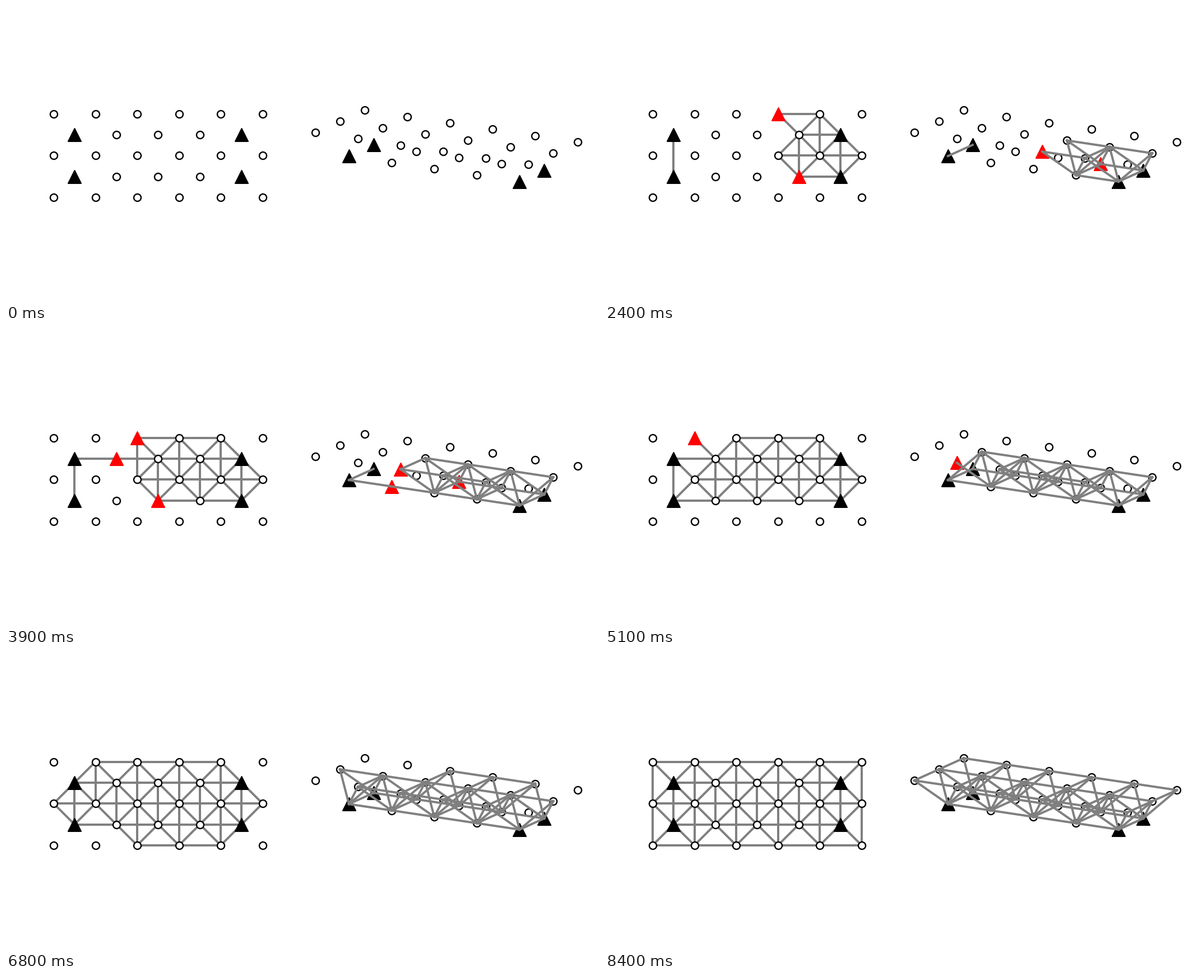
Write a matplotlib script that moves like this. It is 1058x529 px and loops after 8900 ms.

```python
import matplotlib.pyplot as plt
import numpy as np
from matplotlib.animation import FuncAnimation
from matplotlib.collections import LineCollection

W, H, DPI = 1058, 529, 100
PT = 72 / DPI                      # points per pixel
HOLD, FRAMES, INTERVAL = 5, 89, 100

# Nodes are named layer, column, row: T is the top grid, B the bottom one.
NODES = [f"T{c}{r}" for c in range(6) for r in range(3)]
NODES += [f"B{c}{r}" for c in range(5) for r in range(2)]
SUPPORTS = ["B00", "B01", "B40", "B41"]

# Members in the order of assembly: each node with the nodes it is joined to.
ASSEMBLY = """
B00:B01 B40:B41 T41:B40,B41 T51:B40,B41,T41 T40:B40,T41 B30:B40,T40,T41
B31:T41,B41,B30 T31:B31,T41,B30 T30:T40,B30,T31 B20:B30,T31,T30
B21:B31,T31,B20 T20:T30,B20 T21:T31,B20,B21,T20 B10:B20,B00,T21,T20
T11:T21,B00,B10,B01 B11:T11,B01,B10,T21,B21 T10:B10,B00,T11,T20
T01:B00,B01,T11 T22:B21,B11,T21 T32:T22,B21,B31,T31 T42:T32,B31,B41,T41
T12:T22,B01,B11,T11 T50:T40,B40,T51 T02:T12,B01,T01 T00:T10,B00,T01
T52:T42,B41,T51
"""
MEMBERS = [(node, end)
           for node, ends in (item.split(":") for item in ASSEMBLY.split())
           for end in ends.split(",")]

# A new node is propped for two steps unless it must wait for a stable frame.
LATE_RELEASE = {"T41": 9, "T40": 16, "B31": 27, "B21": 42, "T20": 36, "B10": 37}


def prop_times():
    times = {}
    for step, (node, _) in enumerate(MEMBERS, 1):
        if node not in SUPPORTS and node not in times:
            times[node] = (step, LATE_RELEASE.get(node, step + 2))
    return times


def grid(node):
    low = node[0] == "B"
    return int(node[1]) + 0.5 * low, int(node[2]) + 0.5 * low, low


def plan(node):
    c, r, _ = grid(node)
    return 85 + 74.55 * c, 192.6 + 74.6 * r


def oblique(node):
    c, r, low = grid(node)
    return 551.8 + 76.1 * c + 44 * r, 226 + 11.4 * c - 19.9 * r + 46.4 * low


class View:
    def __init__(self, ax, project, line_order):
        self.pos = {n: project(n) for n in NODES}
        self.lines = LineCollection([], colors="gray", linewidths=4 * PT,
                                    capstyle="projecting", zorder=line_order)
        ax.add_collection(self.lines)
        self.joints = self.marks(ax, "o", 13, "white", "black", 2.4, 2)
        self.fixed = self.marks(ax, "^", 23, "black", "black", 2.08, 3)
        self.props = self.marks(ax, "^", 23, "red", "red", 2.08, 4)
        self.fixed.set_offsets(self.points(SUPPORTS))

    @staticmethod
    def marks(ax, marker, size, face, edge, width, order):
        return ax.scatter([], [], s=(size * PT) ** 2, marker=marker,
                          facecolors=face, edgecolors=edge,
                          linewidths=width * PT, zorder=order)

    def points(self, nodes):
        return np.array([self.pos[n] for n in nodes]).reshape(-1, 2)

    def show(self, members, propped):
        self.lines.set_segments([self.points(m) for m in members])
        self.props.set_offsets(self.points(propped))
        free = [n for n in NODES if n not in SUPPORTS and n not in propped]
        self.joints.set_offsets(self.points(free))


fig = plt.figure(figsize=(W / DPI, H / DPI), dpi=DPI, facecolor="white")
ax = fig.add_axes([0, 0, 1, 1])
ax.axis("off")
views = [View(ax, plan, 1), View(ax, oblique, 5)]
ax.set_xlim(0, W)
ax.set_ylim(H, 0)
PROPS = prop_times()


def update(frame):
    step = min(max(frame - HOLD + 1, 0), len(MEMBERS))
    propped = [n for n, (start, end) in PROPS.items() if start <= step < end]
    for view in views:
        view.show(MEMBERS[:step], propped)
    return []


anim = FuncAnimation(fig, update, frames=FRAMES, interval=INTERVAL,
                     init_func=lambda: update(0), repeat=True)
plt.show()
```
